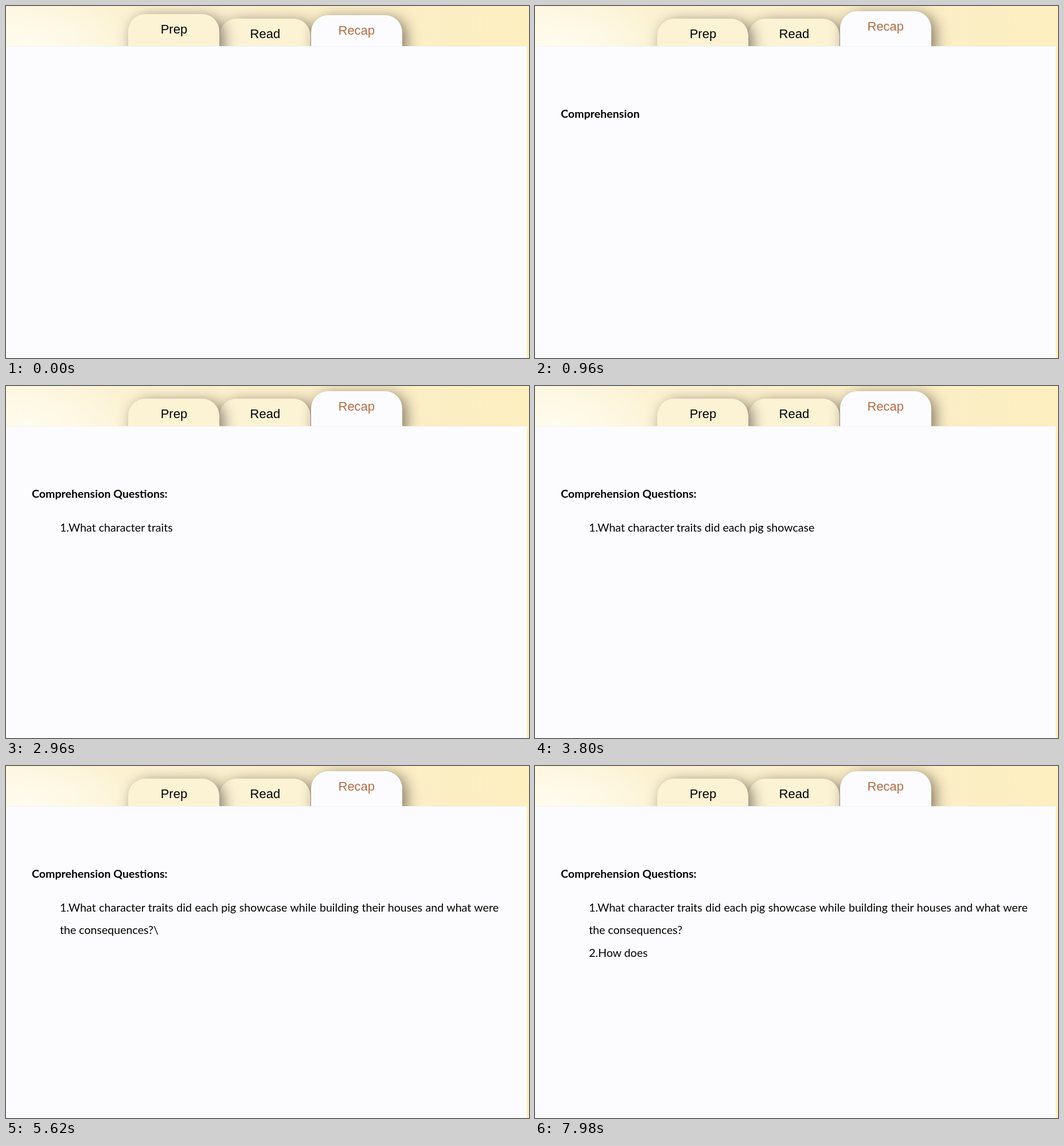
These frames come from a looping animation (912 by 614 pixels, 8 s). An HTML page:

```html
<!DOCTYPE html>
<html lang="en">
<head>
<meta charset="utf-8">
<title>Recap</title>
<style>
  html, body { margin: 0; width: 100%; height: 100%; overflow: hidden; }
  #stage {
    position: relative; width: 912px; height: 614px; overflow: hidden;
    background:
      radial-gradient(200px 75px at 40px 62px, #fffdf2cc, #fffdf200),
      linear-gradient(90deg, #fef6de, #fcf2d2 22%, #fbeec8 70%, #fdefc0);
  }
  .tab {
    position: absolute; top: 21.5px; width: 159px; height: 80px;
    border-radius: 30px 30px 0 0; background: #fcf2d4; color: #000;
    box-shadow: 7px 5px 24px rgba(45, 34, 30, .58);
    font: 22px/54px "Liberation Sans", Arial, sans-serif; text-align: center;
  }
  #prep { left: 213.4px; z-index: 2; }
  #read { left: 372.4px; z-index: 1; }
  #recap { left: 531.8px; z-index: 3; background: #fcfcfe; color: #b46c48; }
  #panel {
    position: absolute; z-index: 4; left: 0; top: 70px; width: 908px; height: 544px;
    background: #fcfcfe; box-shadow: inset 0 1px #f2f2fa;
  }
  .line {
    position: absolute; z-index: 5; left: 94px; width: 765px;
    font: 19.6px/40px Lato, sans-serif; white-space: pre; color: #000;
  }
  .line.full { text-align-last: justify; white-space: normal; }
  .line.title { left: 45px; font-weight: 700; }
</style>
</head>
<body>
<div id="stage">
  <div class="tab" id="prep">Prep</div>
  <div class="tab" id="read">Read</div>
  <div class="tab" id="recap">Recap</div>
  <div id="panel"></div>
  <div class="line title" style="top:167.5px"></div>
  <div class="line" style="top:226.5px"></div>
  <div class="line" style="top:266px"></div>
  <div class="line" style="top:305.5px"></div>
</div>
<script>
  const LOOP = 8000, FIRST = 810, TICK = 200, SETTLE = 240;
  const ERASE = "\b";
  const pause = n => Array(n).fill("");

  // One token arrives per tick; empty tokens are silent ticks.
  const tokens = [
    "Comprehension", " Questions", ":", ...pause(3),
    "\n1", ".", "What", " character", " traits", " did", " each", " pig",
    " showcase", " while", " building", " their", " houses", " and", " what", " were",
    "\nthe", " consequences", "?\\", ERASE, ...pause(6),
    "\n2", ".", "How", " does"
  ];

  const lines = [...document.querySelectorAll(".line")];
  const prep = document.getElementById("prep");
  const recap = document.getElementById("recap");
  let shown = -1;

  const append = (text, token) => token === ERASE ? text.slice(0, -1) : text + token;

  function showText(count) {
    if (count === shown) return;
    shown = count;
    const parts = tokens.slice(0, count).reduce(append, "").split("\n");
    lines.forEach((line, i) => line.textContent = parts[i] || "");
    lines[1].classList.toggle("full", parts.length > 2);
  }

  function draw() {
    const t = performance.now() % LOOP;
    const left = Math.pow(1 - Math.min(t / SETTLE, 1), 2);
    prep.style.top = 21.5 - 7.5 * left + "px";
    recap.style.top = 9 + 7 * left + "px";
    showText(Math.max(0, Math.floor((t - FIRST) / TICK) + 1));
    requestAnimationFrame(draw);
  }
  draw();
</script>
</body>
</html>
```
